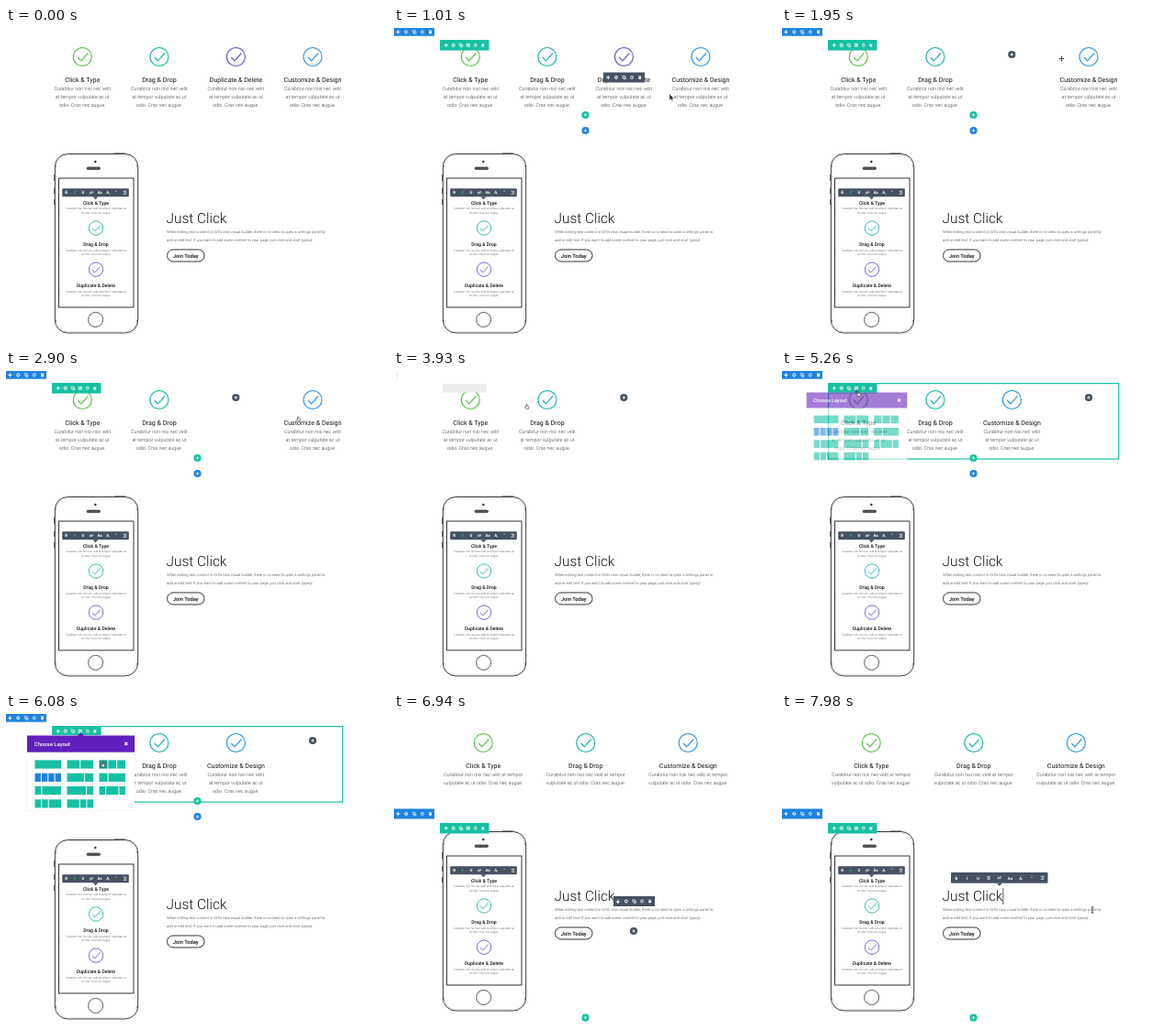
Write an HTML page that moves like this. It is 416x344 px and loops after 8 s.

```html
<!DOCTYPE html>
<html lang="en">
<head>
<meta charset="utf-8">
<title>Page builder</title>
<style>
html, body { margin: 0; width: 100%; height: 100%; overflow: hidden; background: #fff; }
svg { display: block; font-family: Roboto, sans-serif; text-rendering: geometricPrecision; }
</style>
</head>
<body>
<svg id="stage" width="416" height="344" viewBox="0 0 416 344"></svg>
<script>
const LOOP = 8000;
const GREEN = '#17c0a2', BLUE = '#1f82de', GREY = '#465260', PURPLE = '#611fbd';
const stage = document.getElementById('stage');

const at = (x, y, body, opacity = 1, scale = 1) =>
  `<g transform="translate(${x} ${y}) scale(${scale})" opacity="${opacity}">${body}</g>`;
const rect = (x, y, w, h, fill, more = '') =>
  `<rect x="${x}" y="${y}" width="${w}" height="${h}" fill="${fill}" ${more}/>`;
const line = (d, color, width = 1, fill = 'none') =>
  `<path d="${d}" fill="${fill}" stroke="${color}" stroke-width="${width}" stroke-linejoin="round"/>`;
const text = (s, x, y, size, weight = 300, color = '#333', anchor = 'middle') =>
  `<text x="${x}" y="${y}" font-size="${size}" font-weight="${weight}" fill="${color}" text-anchor="${anchor}">${s}</text>`;

const between = (t, a, b) => t >= a && t < b;
const ramp = (t, a, b) => Math.min(1, Math.max(0, (t - a) / (b - a)));
const smooth = u => u * u * (3 - 2 * u);

// Page content
const check = (x, y, r, color) =>
  at(x, y, `<circle r="10" fill="none" stroke="${color}" stroke-width="1.15"/>` +
    line('M-5 .5L-1.5 4.3L6 -4', color, 1.15), 1, r / 10);

const FOUR = ['Curabitur non nisi nec velit', 'at tempor vulputate ac ut', 'odio. Cras nec augue.'];
const THREE = ['Curabitur non nisi nec velit at tempor', 'vulputate ac ut odio. Cras nec augue.'];
const PHONE = ['Curabitur non nisi nec velit at tempor vulputate ac', 'ut odio. Cras nec augue.'];
const CLICK = ['Click &amp; Type', '#5cc04c'];
const DRAG = ['Drag &amp; Drop', '#1cb3a8'];
const DUPE = ['Duplicate &amp; Delete', '#6058d0'];
const CUSTOM = ['Customize &amp; Design', '#2b96ea'];

const blurb = (x, [name, color], lines, opacity = 1) => at(x, 0,
  check(0, 31.5, 10, color) + text(name, 0, 59, 7.05, 400, '#111') +
  lines.map((s, i) => text(s, 0, 68 + i * 9, 5.37)).join(''), opacity);

const phoneBlurb = (y, name) => text(name, 98, y, 5.15, 500, '#111') +
  PHONE.map((s, i) => text(s, 98, y + 5.6 + i * 4.8, 3.07)).join('');

// Text formatting bar
const LINK = line('M-1.6 1.6L1.6 -1.6M-2 .4L-.6 -1M.6 1L2 -.4', '#fff', .9);
const BIN = line('M-1.6 -1.3H1.6M-1 -.8V1.8H1V-.8', '#fff', .8);
const ALIGN = line('M-1.8 -1.5H1.8M-.6 0H1.8M-1.8 1.5H1.8', '#fff', .7);
const letter = (s, color = '#fff') => text(s, 0, 1.6, 4.4, 700, color);
const editBar = (x, y, w, h, icons, gap) => at(x, y,
  rect(0, 0, w, h, GREY, 'rx="1"') +
  `<path d="M${w / 2 - 3} ${h}h6l-3 3z" fill="${GREY}"/>` +
  icons.map((icon, i) => at(w / 2 + (i - (icons.length - 1) / 2) * gap, h / 2, icon)).join(''));
const barIcons = active => [letter('B'), letter('<tspan font-style="italic">I</tspan>', active),
  letter('U'), BIN, LINK, letter('Aa'), letter('A,'), letter('”'), ALIGN];

const phone =
  rect(53.3, 137.5, 90.4, 195.5, '#fff', 'rx="14" stroke="#3a3a3a"') +
  rect(54.8, 138.8, 87.4, 192.9, 'none', 'rx="13" stroke="#ccc" stroke-width=".5"') +
  line('M52.6 160v7M52.6 175v6M52.6 187v6M118 136.9h12M53 151h2M142 151h2M53 320h2M142 320h2', '#444', .9) +
  rect(57.5, 164, 81.5, 141, '#fff', 'stroke="#333"') +
  `<circle cx="97.3" cy="146" r="1.2" fill="#333"/>` +
  rect(88, 152, 14.5, 2.6, '#555', 'rx="1.3" stroke="#333" stroke-width=".7"') +
  `<circle cx="97.6" cy="318.5" r="8" fill="#fff" stroke="#444" stroke-width=".9"/>` +
  editBar(61.2, 175.3, 72.6, 8.9, barIcons('#2ee6c8').filter(i => i !== BIN), 9.1) +
  phoneBlurb(192.7, CLICK[0]) + check(98, 218.5, 7.7, DRAG[1]) +
  phoneBlurb(238, DRAG[0]) + check(98, 263.7, 7.7, DUPE[1]) +
  phoneBlurb(283, DUPE[0]);

const intro = text('Just Click', 174.6, 212.5, 15.4, 300, '#111', 'start') +
  text('When editing text content in Orfi’s new visual builder, there is no need to open a settings panel to',
    175, 223.5, 4.13, 300, '#333', 'start') +
  text('add or edit text. If you want to add some content to your page, just click and start typing!',
    175, 232.7, 4.13, 300, '#333', 'start') +
  rect(175.5, 242, 40.5, 13, '#fff', 'rx="6.5" stroke="#333"') +
  text('Join Today', 195.7, 250.6, 5.8, 500, '#111');

// Builder controls
const MOVE = line('M-2 0H2M0 -2V2', '#fff', 1) +
  '<path d="M-2.7 0l1.2-1v2zM2.7 0l-1.2-1v2zM0-2.7l1 1.2h-2zM0 2.7l1-1.2h-2z" fill="#fff"/>';
const GEAR = '<circle r="1.6" fill="none" stroke="#fff" stroke-width="1.1"/>' +
  '<circle r="2.3" fill="none" stroke="#fff" stroke-width=".6" stroke-dasharray=".9 .9"/>';
const COPY = line('M-2 -2H1V.6H-2ZM-.6 1V2.2H2.2V-.6H1.4', '#fff', .8);
const GRID = line('M-2 -1.7H2V1.7H-2ZM-.7 -1.7V1.7M.7 -1.7V1.7', '#fff', .8);
const POWER = '<circle r="1.9" fill="none" stroke="#fff" stroke-width=".8"/>' + line('M0 -1.3V.4', '#fff', .8);
const TRASH = '<path d="M-1.6-1h3.2v3.2h-3.2zM-2-2.2h4v.8h-4z" fill="#fff"/>';

const tab = (x, y, w, h, fill, icons, gap) => at(x, y, rect(0, 0, w, h, fill) +
  icons.map((icon, i) => at(w / 2 + (i - (icons.length - 1) / 2) * gap, h / 2, icon, 1, .85)).join(''));
const sectionTab = (y, h) => tab(0, y, 44, h, BLUE, [MOVE, GEAR, COPY, POWER, TRASH], 8.8);
const rowTab = y => tab(50, y, 53.5, 11.5, GREEN, [MOVE, GEAR, COPY, GRID, POWER, TRASH], 8);
const moduleTab = (x, y) => tab(x - 22.5, y, 45, 11, GREY, [MOVE, GEAR, COPY, POWER, TRASH], 8.6);
const plus = (x, y, color) =>
  at(x, y, `<circle r="4.1" fill="${color}"/>` + line('M-1.7 0H1.7M0 -1.7V1.7', '#fff', .9));

const LAYOUTS = ['1', '11', '111', '1111', '21', '12', '13', '31', '121', '112', '211'];
function layout(code, i, hover) {
  const parts = [...code].map(Number), unit = (28.5 - (parts.length - 1)) / parts.reduce((a, b) => a + b);
  const fill = code === '1111' ? BLUE : GREEN;
  let x = 31.5 + (i % 3) * 35;
  return parts.map((p, j) => {
    const cell = rect(x, 50.4 + Math.floor(i / 3) * 14.3, p * unit, 9.2, hover && !j ? '#159580' : fill);
    x += p * unit + 1;
    return cell;
  }).join('');
}
const popup = hover =>
  rect(22, 23, 119, 83, '#000', 'opacity=".04" rx="2"') + rect(23, 23, 117, 82, '#fff') +
  rect(23, 23.5, 117, 18.2, PURPLE) + `<path d="M78 24l3.5-4 3.5 4z" fill="${PURPLE}"/>` +
  text('Choose Layout', 30.8, 34.8, 5.9, 500, '#fff', 'start') +
  line('M129.2 30.9l3.2 3.2M132.4 30.9l-3.2 3.2', '#fff', 1.2) +
  LAYOUTS.map((code, i) => layout(code, i, hover && i === 2)).join('');

// Pointer: [time, x, y]
const PATH = [[600, 345, 125], [840, 322, 100], [1010, 300, 72], [1190, 270, 56], [1480, 267, 54],
  [1720, 267, 54], [1950, 304.5, 33.5], [2430, 326, 52], [2900, 318, 50], [3520, 200, 42], [3930, 144.3, 36.5],
  [4080, 144.3, 36.5], [4670, 81, 20], [5140, 81, 20], [5840, 105, 53], [6310, 105, 53], [6640, 170, 120],
  [6940, 243, 202], [7150, 243, 202], [7360, 240, 199], [7500, 240, 199], [7980, 338, 214]];
const POINTERS = {
  arrow: line('M0 0V7L1.7 5.5L2.8 8L4 7.5L2.9 5.1H5Z', '#fff', .5, '#222'),
  hand: at(0, 0, line('M-.6 0Q.3 -1 .9 0V2.3L3 2.8Q3.8 3 3.6 4L3 6.6H-.2L-2.2 3.8Q-2 2.8 -.6 3.7Z', '#333', .8, '#fff'), 1, .75),
  move: line('M-2 0H2M0 -2V2', '#333', .8) +
    '<path d="M-3 0l1.4-1.1v2.2zM3 0l-1.4-1.1v2.2zM0-3l1.1 1.4h-2.2zM0 3l1.1-1.4h-2.2z" fill="#333"/>',
  beam: line('M-1.3 -3H1.3M0 -3V3M-1.3 3H1.3', '#333', .9)
};
function pointer(t) {
  if (t < PATH[0][0]) return '';
  let i = PATH.findIndex(p => p[0] > t);
  if (i < 0) i = PATH.length - 1;
  const [t0, x0, y0] = PATH[i - 1], [t1, x1, y1] = PATH[i];
  const u = smooth(ramp(t, t0, t1));
  const kind = t < 1190 ? 'arrow' : t < 1800 ? 'hand' : t < 2900 ? 'move'
    : t < 6310 ? 'hand' : t < 6900 ? 'arrow' : t < 7500 ? 'hand' : 'beam';
  return at(x0 + (x1 - x0) * u, y0 + (y1 - y0) * u, POINTERS[kind]);
}

function topRow(t) {
  if (t >= 6200) return blurb(97.2, CLICK, THREE) + blurb(208.8, DRAG, THREE) + blurb(320.3, CUSTOM, THREE);
  let s = blurb(83.3, CLICK, FOUR) + blurb(166.9, DRAG, FOUR);
  if (t < 1720) s += blurb(250.4, DUPE, FOUR);
  else if (t < 4080) s += plus(250.3, 29, GREY);
  else s += blurb(250.4, CUSTOM, FOUR) + plus(334, 29, GREY);
  if (t < 3520) s += blurb(334, CUSTOM, FOUR, 1 - ramp(t, 2900, 3520));
  return s;
}

function controls(t) {
  const shift = t < 6200 ? 0 : -9;
  let s = '';
  if (between(t, 4850, 6310)) s += rect(50.6, 13.6, 316, 82.5 + shift, 'none', `stroke="${GREEN}" stroke-width="1.2"`);
  if (between(t, 840, 3700) || between(t, 4080, 6520))
    s += sectionTab(0, 8.7) + rowTab(13) + plus(208.5, 95 + shift, GREEN) + plus(208.5, 112 + shift, BLUE);
  if (between(t, 3700, 4080)) s += rect(53, 14, 48, 9.5, '#ededed') + rect(3, 0, .7, 8, '#ddd');
  if (between(t, 1010, 1720)) s += moduleTab(250.5, 48.5);
  if (between(t, 2070, 2540)) s += moduleTab(334, 48.5);
  if (between(t, 5140, 6200)) {
    const u = smooth(ramp(t, 5140, 5360)), k = .85 + .15 * u;
    s += at(81 * (1 - k), 22 * (1 - k), popup(t >= 5840), u, k);
  }
  if (t >= 6640) s += plus(208.5, 331.7, GREEN);
  if (t >= 6790) s += sectionTab(103.5, 11) + rowTab(119);
  if (between(t, 6940, 7360)) s += moduleTab(261.5, 199) + plus(261, 237, GREY);
  if (t >= 7500) s += editBar(184, 173, 105.5, 11.8, barIcons('#fff'), 11.7) + line('M240.8 190V208', '#333', .8);
  return s;
}

function draw() {
  const t = performance.now() % LOOP;
  stage.innerHTML = topRow(t) + at(0, t < 6200 ? 0 : -9, phone + intro) + controls(t) + pointer(t);
  requestAnimationFrame(draw);
}
draw();
</script>
</body>
</html>
```
